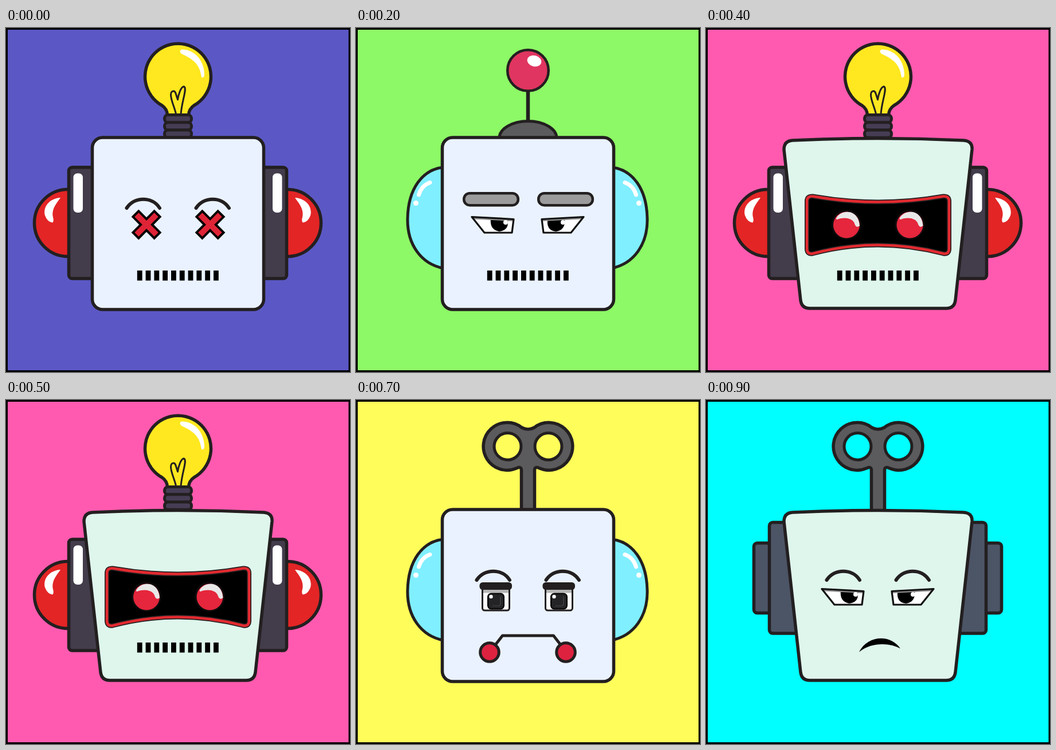
Write an HTML page that moves like this. It is 600x600 px and loops after 1 s.

```html
<!DOCTYPE html>
<html lang="en">
<head>
<meta charset="utf-8">
<title>Robots</title>
<style>
html, body { margin: 0; width: 100%; height: 100%; overflow: hidden; background: #000; }
svg { display: block; width: 100vw; height: 100vh; }
</style>
</head>
<body>
<svg id="stage" viewBox="0 0 600 600"></svg>
<script>
const INK = '#231f20';
const SLOT = 200;

const shape = (d, fill, extra = '') => `<path d="${d}" fill="${fill}" ${extra}/>`;
const line = (width, color = INK) =>
  `stroke="${color}" stroke-width="${width}" stroke-linecap="round" stroke-linejoin="round"`;
const box = (x, y, w, h, r, fill, extra = '') =>
  `<rect x="${x}" y="${y}" width="${w}" height="${h}" rx="${r}" fill="${fill}" ${extra}/>`;
const disc = (x, y, r, fill, extra = '') =>
  `<circle cx="${x}" cy="${y}" r="${r}" fill="${fill}" ${extra}/>`;
const mirror = (art, sum = 599) =>
  art + `<g transform="translate(${sum} 0) scale(-1 1)">${art}</g>`;
const twice = (art, dx) => art + `<g transform="translate(${dx} 0)">${art}</g>`;

// Heads
const squareHead = () => box(150.5, 191, 299, 300, 18, '#eaf2ff', line(5.5));
const taperHead = () => shape(
  'M151 196 Q300 189 449 196 Q465 197 464 212 L435 475 Q433 489 419 489 ' +
  'H181 Q167 489 165 475 L136 212 Q136 197 151 196Z', '#dff6ec', line(5.5));

// Ears
const redEars = () => mirror(
  disc(108, 340, 58.5, '#e32526', line(5.5)) +
  shape('M95 296 C76 297 64 312 68 327 Q72 338 81 339.5 Q84 337 82 330 C79 316 88 306 95 296Z', '#fff') +
  box(109.5, 243, 70, 194, 6, '#433c4b', line(5.5)) +
  box(117.5, 253.5, 16.5, 68.5, 7, '#fff'));
const blueEars = () => mirror(
  shape('M152 243 C116 247 91 280 90 332 C89 377 113 411 152 419Z', '#80efff', line(5)) +
  shape('M109.5 291 Q114 275 129 269.5', 'none', line(7, '#fff')) +
  disc(104.5, 305.5, 4.5, '#fff'), 598);
const slateEars = () => mirror(
  box(83.5, 249.5, 50, 122, 6, '#4c5566', line(5.5)) +
  box(110.5, 213.5, 70, 193.5, 6, '#4c5566', line(5.5)));

// Tops
const bulb = () =>
  shape('M281.5 152 Q281 141 272 135 A57.5 57.5 0 1 1 328 135 Q319 141 318.5 152Z', '#ffe81f', line(5.5)) +
  shape('M306 37.5 C328 37 345 55 346 80 Q346 88 341 86 C338 65 330 56 306 45 Q301 40 306 37.5Z', '#fff') +
  shape('M296.5 150 C294 138 287 125 287.5 116 C288 109 294 108 296 114 L299.5 125 ' +
    'C301 115 305 103 310 102 C317 104 307 125 305 150', 'none', line(3)) +
  [151.5, 164.8, 178].map(y => box(276.5, y, 47, 13.3, 6, '#463d55', line(5))).join('');
const antenna = () =>
  shape('M300 108 V164', 'none', line(6.5)) +
  disc(300, 74, 35.8, '#e03560', line(4.5)) +
  '<ellipse cx="311" cy="57.5" rx="12.5" ry="9.5" fill="#fff" transform="rotate(15 311 57.5)"/>' +
  `<ellipse cx="300" cy="192" rx="50" ry="29.5" fill="#5b5a5c" ${line(5)}/>`;
const windKey = bg =>
  shape('M288.5 195 V122 Q288 115 280 119 A41.5 41.5 0 1 1 289 48 Q300 54 311 48 ' +
    'A41.5 41.5 0 1 1 320 119 Q312 115 311.5 122 V195', '#5b5a5c', line(5.5)) +
  mirror(disc(264.5, 81, 23.5, bg, line(5)), 600);

// Eyes
const arcBrows = () => twice(shape('M210.5 314 C224 293.5 255 293.5 268 314', 'none', line(6)), 121);
const crossEyes = () => {
  const a = 26.3, b = 7;
  const d = `M${-b} ${-a}H${b}V${-b}H${a}V${b}H${b}V${a}H${-b}V${b}H${-a}V${-b}H${-b}Z`;
  return arcBrows() + twice(shape(d, '#de2436',
    'stroke="#000" stroke-width="4" transform="translate(245 343) rotate(45)"'), 111);
};
const narrowEyes = () => mirror(
  shape('M202 329.5 L275 333.5 L272 357 H224Z', '#fff') +
  shape('M235 333 H264.5 Q268 353 250 355 Q233 352 235 333Z', '#000') +
  shape('M202 329.5 L275 333.5 L274.5 337 L207 333.5Z', '#8f8f8f') +
  shape('M202 329.5 L275 333.5 L272 357 H224Z', 'none', line(3.2, '#111'))) +
  disc(261, 339, 4, '#fff') + disc(361, 339, 4, '#fff');
const thickBrows = () => twice(box(188.3, 288.2, 94.5, 21, 10, '#9b9b9b', line(4.5)), 130);
const visor = () => {
  const d = 'M186 293.5 Q300 313.5 414 293.5 Q424 293 424 302 V385 Q424 395 414 393.5 ' +
    'Q300 363.5 186 393.5 Q176 395 176 385 V302 Q176 293 186 293.5Z';
  const eye = disc(245, 343, 26, '#100b0d') + disc(245, 343.5, 23, '#e5263c') +
    shape('M227.5 331 C236 316 266 315 268 345 Q262 350 259 341 C256 332 242 329 229 334 Q226 334 227.5 331Z', '#e8e8e8');
  return shape(d, '#000', line(8, INK)) + shape(d, 'none', line(4.6, '#e32a30')) + twice(eye, 110.5);
};
const sleepyEyes = () => arcBrows() + twice(
  box(220.5, 326, 47, 41, 4, '#fff') +
  box(221, 330, 46, 6.5, 0, '#b5b5b5') +
  box(230, 337.5, 28, 27, 6, '#242326', line(2, '#000')) +
  shape('M252 343 V355 Q252 359 248 359 H238', 'none', line(1.2, '#4a494c')) +
  disc(235.5, 343, 3.2, '#fff') +
  box(220.5, 326, 47, 41, 4, 'none', line(3)) +
  box(215.5, 318, 56.5, 13, 5.5, INK), 110);

// Mouths
const grille = () =>
  Array.from({ length: 10 }, (_, i) => box(228.8 + i * 14.8, 423, 8.8, 17.5, 0, '#000')).join('');
const sadWire = () =>
  shape('M233 440 L255.5 411 H344.5 L367 440', 'none', line(5)) +
  mirror(disc(233, 440, 16.3, '#dd2240', line(5)));
const frown = () => shape('M267 439.5 C282 410 322 408 339 433.5 C322 424 290 421 267 439.5Z', '#000');

const robots = [
  ['#5b58c5', redEars, bulb, squareHead, crossEyes, grille],
  ['#8df966', blueEars, antenna, squareHead, thickBrows, narrowEyes, grille],
  ['#ff5aaf', redEars, bulb, taperHead, visor, grille],
  ['#fffd5a', blueEars, windKey, squareHead, sleepyEyes, sadWire],
  ['#00ffff', slateEars, windKey, taperHead, arcBrows, narrowEyes, frown]
];

const stage = document.getElementById('stage');
stage.innerHTML = box(0, 0, 600, 600, 0, '#000') + robots.map(([bg, ...parts]) =>
  `<g display="none">${box(3, 3, 594.5, 594, 0, bg)}${parts.map(part => part(bg)).join('')}</g>`).join('');
const groups = [...stage.children].slice(1);

function draw(ms) {
  const current = Math.floor(ms / SLOT) % groups.length;
  groups.forEach((g, i) => g.setAttribute('display', i === current ? 'inline' : 'none'));
}

const start = performance.now();
function tick() {
  draw(performance.now() - start);
  requestAnimationFrame(tick);
}
tick();
</script>
</body>
</html>
```
